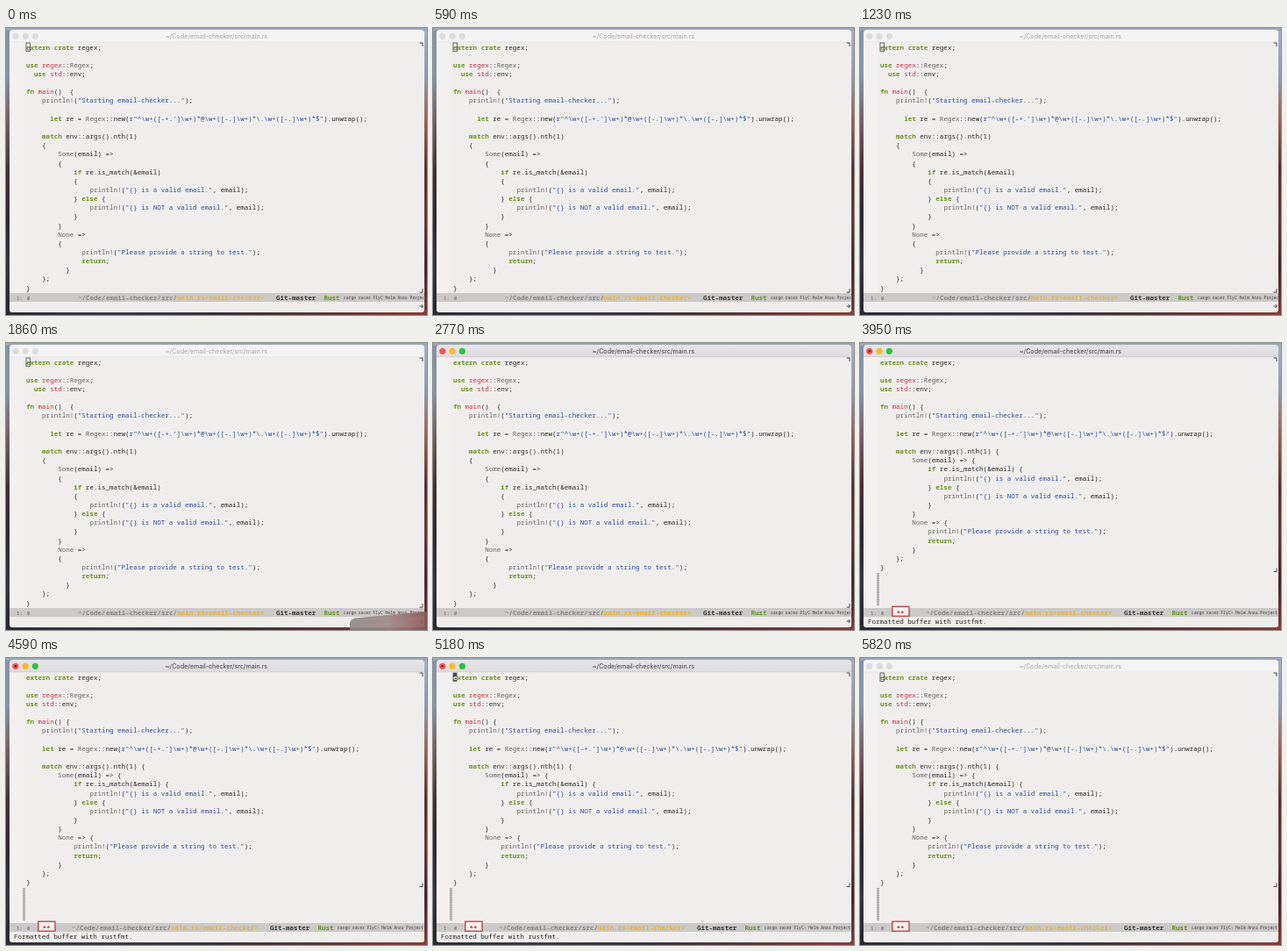
Animation, 480 px wide and 327 px high, one loop 5.87 s. Source, as an HTML page with a canvas:

```html
<!DOCTYPE html>
<html lang="en">
<head>
<meta charset="utf-8">
<title>Editor</title>
<style>
html, body { margin: 0; width: 100%; height: 100%; overflow: hidden; background: #2c2b34; }
canvas { display: block; width: 480px; height: 327px; }
</style>
</head>
<body>
<canvas id="stage" width="480" height="327"></canvas>
<script>
const ctx = document.getElementById('stage').getContext('2d');
const LOOP = 5870;
const MONO = '"Noto Sans Mono", "DejaVu Sans Mono", monospace';
const SANS = 'Inter, Roboto, sans-serif';
const SIZE = 7.54, CHAR = SIZE * 0.6, LINE = 10.148, LEFT = 23, BASE = 24.6;

// Moments, in ms
const PANEL_IN = 1790, PANEL_OUT = 2040, FOCUS = 2060, FORMAT = 3040, BLUR = 5500;
const BLINK = 500;

const INK = '#262626', OLIVE = '#6c8f1c', GRAY = '#64625f', BLUE = '#2f4a96', RED = '#c42f40', GOLD = '#efb32a';

const regexLine = String.raw`let re = Regex::new(r"^\w+([-+.']\w+)*@\w+([-.]\w+)*\.\w+([-.]\w+)*$").unwrap();`;

const messy = `extern crate regex;

use regex::Regex;
  use std::env;

fn main()  {
    println!("Starting email-checker...");

      ${regexLine}

    match env::args().nth(1)
    {
        Some(email) =>
        {
            if re.is_match(&email)
            {
                println!("{} is a valid email.", email);
            } else {
                println!("{} is NOT a valid email.", email);
            }
        }
        None =>
        {
              println!("Please provide a string to test.");
              return;
          }
    };
}`.split('\n');

const tidy = `extern crate regex;

use regex::Regex;
use std::env;

fn main() {
    println!("Starting email-checker...");

    ${regexLine}

    match env::args().nth(1) {
        Some(email) => {
            if re.is_match(&email) {
                println!("{} is a valid email.", email);
            } else {
                println!("{} is NOT a valid email.", email);
            }
        }
        None => {
            println!("Please provide a string to test.");
            return;
        }
    };
}`.split('\n');

const TOKEN = /r?"[^"]*"|println!|\w+(::)?|[^\s\w"]+/g;
const KEYWORD = /^(extern|crate|use|fn|let|match|if|else|return)$/;

function style(word) {
  if (/^r?"/.test(word)) return [BLUE, 500];
  if (KEYWORD.test(word)) return [OLIVE, 700];
  if (/^(main|regex::|std::)$/.test(word)) return [RED, 500];
  if (/^(println!|Some|None|Regex(::)?)$/.test(word)) return [GRAY, 500];
  return [INK, 500];
}

function text(str, x, y, color, size = SIZE, weight = 500, family = MONO) {
  ctx.font = `${weight} ${size}px ${family}`;
  ctx.fillStyle = color;
  ctx.fillText(str, x, y);
}

function rect(x, y, w, h, color) {
  ctx.fillStyle = color;
  ctx.fillRect(x, y, w, h);
}

function disc(x, y, r, color) {
  ctx.fillStyle = color;
  ctx.beginPath();
  ctx.arc(x, y, r, 0, Math.PI * 2);
  ctx.fill();
}

function gradient(x, y, ...colors) {
  const g = ctx.createLinearGradient(0, 0, x, y);
  colors.forEach((c, i) => g.addColorStop(i / (colors.length - 1), c));
  return g;
}

function line(points, color, width = 1) {
  ctx.beginPath();
  points.forEach(([x, y]) => ctx.lineTo(x, y));
  ctx.strokeStyle = color;
  ctx.lineWidth = width;
  ctx.stroke();
}

function desktop() {
  rect(0, 0, 240, 327, gradient(0, 327, '#7f93ab', '#8494aa', '#765a5c', '#4a2d33', '#2b2833', '#35343f', '#24252e'));
  rect(240, 0, 240, 327, gradient(0, 327, '#a3b2c3', '#8d9cb0', '#9a5a4a', '#57302f', '#6b3532', '#41262c', '#803a36'));
  rect(0, 0, 480, 3, '#98a7b9');
  rect(0, 321, 480, 6, gradient(480, 0, '#2a2a33', '#3b3a44', '#343038', '#5c3638', '#843d39'));
}

function titleBar(active, changed) {
  ctx.fillStyle = active ? gradient(0, 16, '#e9e6e9', '#dedbde') : '#f5f4f4';
  ctx.beginPath();
  ctx.roundRect(4, 2, 473, 20, [4, 4, 0, 0]);
  ctx.fill();
  const lights = active ? ['#f4564f', '#f8b92f', '#2fc03f'] : ['#dddcdc', '#dddcdc', '#dddcdc'];
  lights.forEach((c, i) => disc(10.8 + i * 11.3, 9.3, 3.6, c));
  if (active && changed) disc(10.8, 9.3, 1.3, '#7a1512');
  ctx.textAlign = 'center';
  text('~/Code/email-checker/src/main.rs', 240, 12, active ? '#3c3b3c' : '#a5a4a4', 7.15, 400, SANS);
  ctx.textAlign = 'left';
}

function code(lines) {
  lines.forEach((str, row) => {
    for (const m of str.matchAll(TOKEN)) {
      const [color, weight] = style(m[0]);
      const [word, colons] = m[0].split(/(?=::)/);
      const x = LEFT + m.index * CHAR;
      text(word, x, BASE + row * LINE, color, SIZE, weight);
      if (colons) text(colons, x + word.length * CHAR, BASE + row * LINE, INK);
    }
  });
}

function fringe(lines) {
  line([[471.5, 17], [475, 17], [475, 21]], '#444');
  const end = BASE + (lines.length - 1) * LINE + 2.5;
  line([[471.5, end], [475, end], [475, end - 4]], '#444');
  if (lines === tidy) {
    rect(19, 262, 3, 37, '#c9c8c6');
    for (let y = 262; y < 299; y += 2) rect(19, y, 3, 1, '#a3a2a0');
  }
}

function cursor(mode) {
  if (mode === 'box') {
    ctx.strokeStyle = '#55565a';
    ctx.lineWidth = 0.9;
    ctx.strokeRect(23, 17, 4.5, 9.5);
  } else if (mode === 'solid') {
    rect(22.7, 16.7, 4.8, 10, '#4b4b4b');
    text('e', LEFT, BASE, '#efeeec', SIZE, 700);
  }
}

function modeLine(changed) {
  rect(4, 302, 473, 10, '#cbcac8');
  text('1:', 12, 309.7, '#5a5a5a', 5.8);
  text('0', 24, 309.7, '#555', 5.4);
  if (changed) {
    rect(37, 300.5, 19, 11, '#f5f2f0');
    ctx.strokeStyle = '#c8262e';
    ctx.lineWidth = 1.2;
    ctx.strokeRect(36.8, 300.2, 19.2, 11);
    text('**', 41.5, 310, '#c8262e', SIZE, 700);
  }
  const x = changed ? 75 : 82;
  text('~/Code/email-checker/src/', x, 309.8, '#858482', SIZE, 700);
  text('main.rs', x + 25 * CHAR, 309.8, GOLD, SIZE, 700);
  text('<email-checker>', x + 32 * CHAR, 309.8, GOLD, SIZE, 700);
  text('Git-master', x + 226, 309.8, '#333', SIZE, 700);
  text('Rust', x + 280.5, 309.8, '#62931c', SIZE, 700);
  ctx.save();
  ctx.beginPath();
  ctx.rect(4, 300, 472, 13);
  ctx.clip();
  text(`cargo racer FlyC${changed ? '-' : ''} Helm Anzu Projectile`, x + 303, 309.3, '#3c3c3c', 4.68);
  ctx.restore();
}

function panel(t) {
  if (t < PANEL_IN || t > PANEL_OUT) return;
  const rise = Math.min(1, (t - PANEL_IN) / 60, (PANEL_OUT - t) / 90);
  const g = ctx.createLinearGradient(392, 0, 480, 0);
  g.addColorStop(0, '#8d8989');
  g.addColorStop(0.5, '#9c8584');
  g.addColorStop(1, '#8c5553');
  ctx.save();
  ctx.globalAlpha = 0.9;
  ctx.fillStyle = g;
  ctx.beginPath();
  ctx.moveTo(392, 330);
  ctx.lineTo(392, 324 - 5 * rise);
  ctx.quadraticCurveTo(393, 327 - 14 * rise, 402, 327 - 14 * rise);
  ctx.lineTo(480, 327 - 21 * rise);
  ctx.lineTo(480, 330);
  ctx.fill();
  ctx.restore();
}

function draw(t) {
  const active = t >= FOCUS && t < BLUR;
  const changed = t >= FORMAT;
  const lines = changed ? tidy : messy;
  const blinkFrom = changed ? FORMAT : FOCUS;
  const lit = Math.floor((t - blinkFrom) / BLINK) % 2 === 0;

  desktop();
  titleBar(active, changed);
  ctx.fillStyle = '#efeeec';
  ctx.beginPath();
  ctx.roundRect(4, 16, 473, 308, [0, 0, 3, 3]);
  ctx.fill();
  rect(4, 16, 16, 286, '#f2f1ef');
  line([[4, 15.8], [477, 15.8]], active ? '#cbc9cb' : '#e3e2e2', 0.7);
  code(lines);
  fringe(lines);
  cursor(!active ? 'box' : lit ? 'solid' : '');
  modeLine(changed);
  if (changed && active) text('Formatted buffer with rustfmt.', 9, 319.6, INK);
  if (!changed) {
    line([[471.5, 317], [475.5, 317]], '#444');
    line([[473.5, 315], [475.5, 317], [473.5, 319]], '#444');
  }
  panel(t);
}

function tick() {
  draw(performance.now() % LOOP);
  requestAnimationFrame(tick);
}
tick();
</script>
</body>
</html>
```
